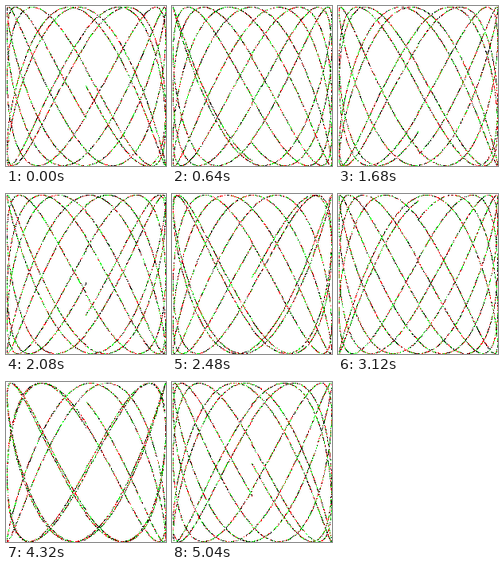
Animation, 201 px wide and 201 px high, one loop 5120 ms. Source, as an HTML page with a canvas:

```html
<!DOCTYPE html>
<html lang="en">
<head>
<meta charset="utf-8">
<title>Lissajous</title>
<style>
  html, body { margin: 0; width: 100%; height: 100%; overflow: hidden; background: #fff; }
  canvas { display: block; width: 201px; height: 201px; image-rendering: pixelated; }
</style>
</head>
<body>
<canvas id="stage" width="201" height="201"></canvas>
<script>
const R = 100, SIDE = 2 * R + 1;
const CYCLES = 5, STEP = 0.001, FREQ = 1.8138;
const POSES = 64, DELAY = 80, PHASE_STEP = 0.1;

const ctx = document.getElementById('stage').getContext('2d');
const image = ctx.createImageData(SIDE, SIDE);
const pixels = new Uint32Array(image.data.buffer);

// ABGR: white, black, red, green
const WHITE = 0xffffffff;
const PALETTE = [WHITE, 0xff000000, 0xff0000ff, 0xff00ff00];

function seeded(seed) {
  let s = Math.imul(seed + 1, 0x9e3779b1);
  return () => (s = Math.imul(s, 1664525) + 1013904223 | 0) >>> 30;
}

const toPixel = v => R + Math.trunc(v * R + 0.5);

function draw(pose) {
  const pick = seeded(pose);
  const phase = pose * PHASE_STEP;
  pixels.fill(WHITE);
  for (let t = 0; t < CYCLES * 2 * Math.PI; t += STEP) {
    const x = toPixel(Math.sin(t));
    const y = toPixel(Math.sin(t * FREQ + phase));
    pixels[y * SIDE + x] = PALETTE[pick()];
  }
  ctx.putImageData(image, 0, 0);
}

const start = performance.now();
let shown = 0;
draw(0);

function tick() {
  const pose = Math.floor((performance.now() - start) / DELAY) % POSES;
  if (pose !== shown) draw(shown = pose);
  requestAnimationFrame(tick);
}
requestAnimationFrame(tick);
</script>
</body>
</html>
```
